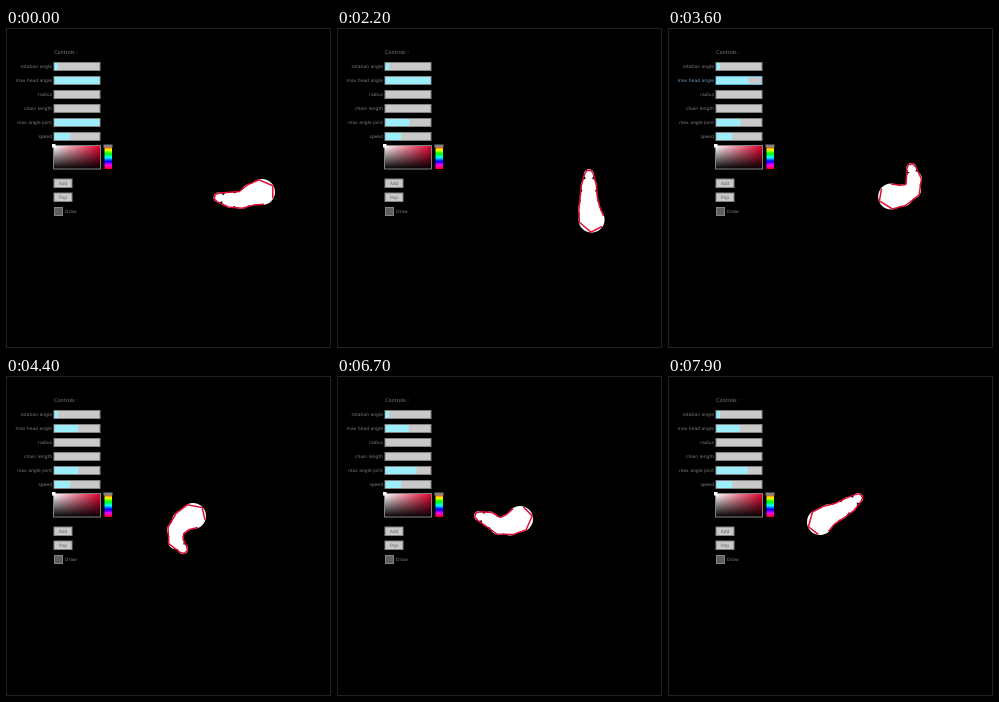
An HTML page that plays this animation: 325x320 px, repeating every 8000 ms.

```html
<!DOCTYPE html>
<html lang="en">
<head>
<meta charset="utf-8">
<title>Chain creature</title>
<style>
  html, body { margin: 0; width: 100%; height: 100%; overflow: hidden; background: #000; }
  svg { display: block; width: 100vw; height: 100vh; }
  text { font: 4.5px "DejaVu Sans", sans-serif; fill: #7c7c7c; }
  .box { fill: #c9c9c9; stroke: #838383; }
</style>
</head>
<body>
<svg id="stage" viewBox="0 0 325 320">
  <defs>
    <linearGradient id="sat"><stop stop-color="#fff"/><stop offset="1" stop-color="#e6002e"/></linearGradient>
    <linearGradient id="val" x2="0" y2="1"><stop stop-color="#000" stop-opacity="0"/><stop offset="1"/></linearGradient>
    <linearGradient id="hue" x2="0" y2="1"></linearGradient>
  </defs>
  <rect width="325" height="320"/>
  <rect x=".5" y=".5" width="324" height="319" fill="none" stroke="#222"/>
  <g id="panel"></g>
  <g id="body" fill="#fff"></g>
  <path id="skin" fill="none" stroke="#e00c34" stroke-width="1.5"/>
</svg>
<script>
const LOOP = 8000, STEP = 100, GAP = 11.4;
const RADII = [13, 11, 9, 8, 5];

// Each leg: start ms, end ms, points the head passes through.
const LEGS = [
  [0, 0, [209,169, 234,172, 256,164]],
  [200, 1200, [269,175, 276,198, 295,182, 290,130, 262,116, 264,132, 286,127, 281,109]],
  [1200, 2900, [258,112, 272,142, 294,124, 262,106, 252,150, 266,201, 281,150, 274,128, 268,136, 260,180]],
  [2900, 3800, [228,166, 238,134, 246,156, 186,170]],
  [4100, 4400, [176,173, 169,160, 187,140]],
  [4400, 5400, [216,165, 247,145, 214,110, 170,124, 165,168]],
  [5400, 6700, [150,181, 121,148, 146,115, 162,135, 146,157, 131,145, 145,140, 163,150, 183,143]],
  [6700, 7900, [194,100, 196,42, 217,65, 189,123, 171,135, 152,146]],
  [7900, 9000, [151,160]]
];

const $ = id => document.getElementById(id);
const clamp = (v, a, b) => Math.max(a, Math.min(b, v));
const lerp = (a, b, k) => a + (b - a) * k;
const ramp = (t, a, b) => clamp((t - a) / (b - a), 0, 1);

function add(parent, tag, attrs, text) {
  const el = document.createElementNS("http://www.w3.org/2000/svg", tag);
  for (const k in attrs) el.setAttribute(k, attrs[k]);
  if (text) el.textContent = text;
  return parent.appendChild(el);
}

// Track: a smooth curve through all points, sampled by arc length.
const knots = [], ends = [];
for (const [, , xy] of LEGS) {
  for (let i = 0; i < xy.length; i += 2) knots.push([xy[i], xy[i + 1]]);
  ends.push(knots.length - 1);
}
const dist = (a, b) => Math.hypot(b[0] - a[0], b[1] - a[1]);

// Unit tangent at a knot; the shorter neighbouring segment weighs more.
function tangent(i) {
  const p = knots[i];
  let x = 0, y = 0;
  for (const [a, b] of [[knots[i - 1], p], [p, knots[i + 1]]]) {
    if (!a || !b) continue;
    const w = dist(a, b) ** 2;
    x += (b[0] - a[0]) / w;
    y += (b[1] - a[1]) / w;
  }
  const n = Math.hypot(x, y) || 1;
  return [x / n, y / n];
}
function hermite(a, b, ma, mb, u) {
  const d = b - a;
  return a + u * (ma + u * (3 * d - 2 * ma - mb + u * (ma + mb - 2 * d)));
}
const SUB = 24, track = [[...knots[0], 0]];
for (let i = 0; i < knots.length - 1; i++) {
  const a = knots[i], b = knots[i + 1], ta = tangent(i), tb = tangent(i + 1), d = dist(a, b);
  for (let j = 1; j <= SUB; j++) {
    const p = track[track.length - 1];
    const q = [0, 1].map(n => hermite(a[n], b[n], ta[n] * d, tb[n] * d, j / SUB));
    track.push([...q, p[2] + dist(p, q)]);
  }
}
const stops = ends.map(i => track[i * SUB][2]);

function at(s) {
  let lo = 0, hi = track.length - 1;
  while (hi - lo > 1) {
    const mid = (lo + hi) >> 1;
    if (track[mid][2] > s) hi = mid; else lo = mid;
  }
  const a = track[lo], b = track[hi], k = clamp((s - a[2]) / (b[2] - a[2]), 0, 1);
  return [lerp(a[0], b[0], k), lerp(a[1], b[1], k)];
}

function travelled(t) {
  let s = stops[0];
  for (let i = 1; i < LEGS.length; i++) {
    s += (stops[i] - stops[i - 1]) * ramp(t, LEGS[i][0], LEGS[i][1]);
  }
  return s;
}

// Control panel
for (let i = 0; i <= 6; i++) {
  add($("hue"), "stop", { offset: i / 6, "stop-color": `hsl(${60 * i},100%,50%)` });
}
const panel = $("panel");
add(panel, "text", { x: 48, y: 26, style: "font-size:5px" }, "Controls :");
const sliders = ["rotation angle", "max head angle", "radius", "chain length", "max angle joint", "speed"]
  .map((name, i) => {
    const y = 34 + 14 * i;
    const label = add(panel, "text", { x: 46, y: y + 5.8, "text-anchor": "end" }, name);
    const box = add(panel, "rect", { class: "box", x: 48, y: y + .5, width: 46, height: 8 });
    const bar = add(panel, "rect", { x: 48.5, y: y + 1, height: 7, fill: "#9ceefa" });
    return (value, active) => {
      bar.setAttribute("width", 45 * value);
      label.style.fill = active ? "#6c9bbc" : "";
      box.style.stroke = active ? "#5bb2d9" : "";
    };
  });
for (const fill of ["url(#sat)", "url(#val)"]) {
  add(panel, "rect", { x: 48, y: 118, width: 46, height: 23, fill });
}
add(panel, "rect", { x: 47.5, y: 117.5, width: 47, height: 23.5, fill: "none", stroke: "#838383" });
add(panel, "rect", { x: 46, y: 116, width: 3.5, height: 3.5, fill: "#fff" });
add(panel, "rect", { x: 98.5, y: 118, width: 7.5, height: 23, fill: "url(#hue)" });
add(panel, "rect", { x: 97.5, y: 116.5, width: 9, height: 3, fill: "#838383" });
["Add", "Pop"].forEach((name, i) => {
  const y = 151 + 14 * i;
  add(panel, "rect", { class: "box", x: 48, y, width: 18, height: 8.5 });
  add(panel, "text", { x: 57, y: y + 5.9, "text-anchor": "middle", style: "fill:#686868" }, name);
});
add(panel, "rect", { x: 48.5, y: 179.5, width: 8, height: 8, fill: "#5e5e5e", stroke: "#838383" });
add(panel, "text", { x: 59, y: 185 }, "Draw");

const discs = RADII.map(r => add($("body"), "circle", { r }));

// Open outline around the joints, with the gap on the side the head turns to.
function outline(joints, turn) {
  const tail = joints.length - 1;
  const dirs = joints.map((p, i) => {
    const a = joints[Math.max(0, i - 1)], b = joints[Math.min(tail, i + 1)];
    return Math.atan2(a[1] - b[1], a[0] - b[0]);
  });
  const rim = (i, deg) => {
    const a = dirs[i] + turn * deg * Math.PI / 180, r = RADII[i] - .5;
    return (joints[i][0] + r * Math.cos(a)).toFixed(2) + " " + (joints[i][1] + r * Math.sin(a)).toFixed(2);
  };
  const order = joints.map((_, i) => i);
  return "M" + [
    ...order.map(i => rim(i, 95)),
    rim(tail, 150), rim(tail, 210),
    ...order.reverse().map(i => rim(i, -90)),
    rim(0, -15), rim(0, 45)
  ].join("L");
}

function draw(time) {
  const t = Math.floor(time % LOOP / STEP) * STEP;
  const s = travelled(t);
  const joints = RADII.map((_, i) => at(s - GAP * i));
  joints.forEach(([x, y], i) => {
    discs[i].setAttribute("cx", x);
    discs[i].setAttribute("cy", y);
  });
  const [h, n] = joints, ahead = at(s + 10);
  const cross = (h[0] - n[0]) * (ahead[1] - h[1]) - (h[1] - n[1]) * (ahead[0] - h[0]);
  $("skin").setAttribute("d", outline(joints, cross < 0 ? -1 : 1));

  const on = (a, b) => t >= a && t < b;
  const joint = 1 - .47 * ramp(t, 1400, 1900) + .16 * ramp(t, 5300, 5700);
  sliders[0](.08);
  sliders[1](1 - .48 * ramp(t, 3300, 3800), on(3200, 4000));
  sliders[2](0);
  sliders[3](0);
  sliders[4](joint, on(1300, 2000) || on(5200, 5900));
  sliders[5](.35);
}

const start = performance.now();
function tick() {
  draw(performance.now() - start);
  requestAnimationFrame(tick);
}
tick();
</script>
</body>
</html>
```
